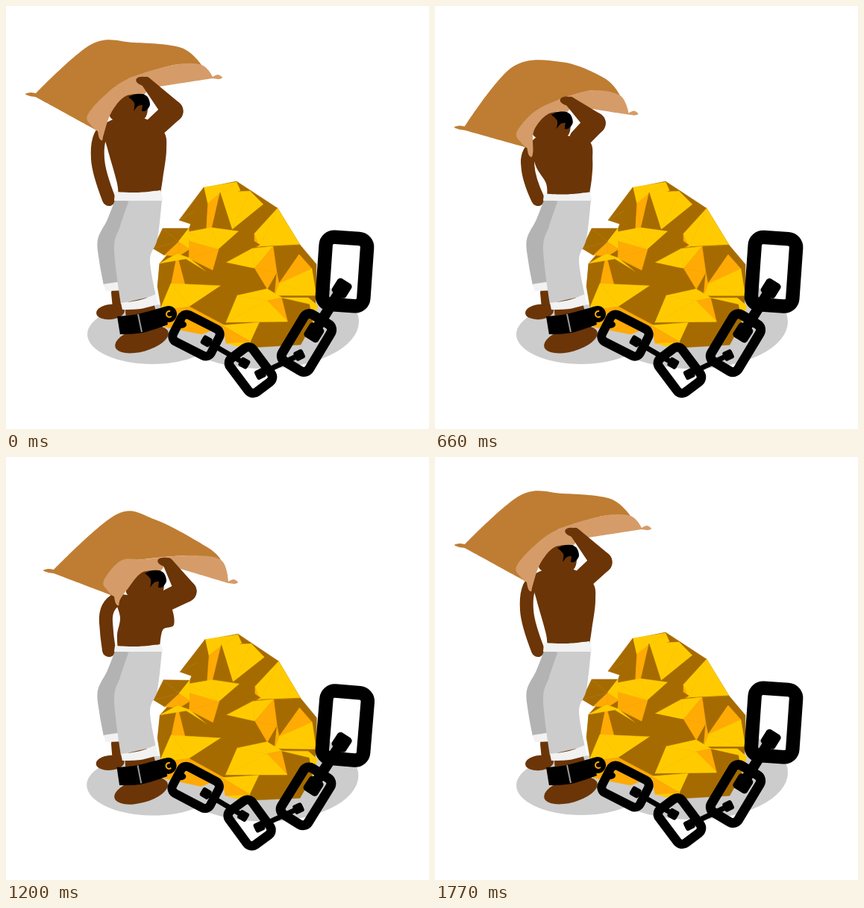
An HTML page with a canvas that plays this animation: 567x567 px, repeating every 1800 ms.

```html
<!DOCTYPE html>
<html>
<head>
<meta charset="utf-8">
<style>
html, body { margin: 0; width: 100%; height: 100%; overflow: hidden; background: #fff; }
canvas { display: block; width: 567px; height: 567px; }
</style>
</head>
<body>
<canvas id="stage" width="567" height="567"></canvas>
<script>
const ctx = document.getElementById('stage').getContext('2d');
const LOOP = 1800, STEP = 30;
const SKIN = '#6b3507', GREY = '#cccccc', CUFF = '#f2f2f2', BLACK = '#000';
const SHADES = { y: '#ffcb00', o: '#ffaa05', d: '#a66b00' };

// Each joint passes through four poses: rise, stoop, lift, lean
const joints = {
  tipL: [[40, 117], [32, 161], [46, 162], [64, 151]],
  crestL: [[115, 51], [86, 99], [118, 68], [148, 77]],
  crestM: [[172, 49], [147, 87], [190, 66], [200, 84]],
  crestR: [[235, 56], [207, 96], [244, 98], [270, 121]],
  hem: [[262, 79], [237, 119], [257, 121], [288, 138]],
  tipR: [[277, 95], [244, 138], [272, 148], [298, 167]],
  brow: [[225, 79], [205, 116], [215, 111], [245, 132]],
  fold: [[165, 97], [155, 136], [175, 117], [185, 137]],
  low: [[124, 168], [110, 207], [136, 177], [146, 187]],
  head: [[0, 0], [-26, 32], [6, 17], [22, 34]],
  shoulder: [[130, 163], [117, 200], [139, 176], [147, 187]],
  elbowL: [[123, 205], [116, 219], [131, 210], [134, 222]],
  side: [[211, 168], [195, 182], [217, 182], [221, 200]],
  elbowR: [[223, 141], [197, 161], [228, 154], [241, 180]],
  hand: [[188, 102], [162, 137], [197, 122], [217, 142]],
  ground: [[0, 0], [-.0066, 3], [.0066, 2], [.0133, 4]]   // tilt, belt drop
};

const times = [0, 510, 930, 1260, 1770, 1800];
const mix = (a, b, k) => a.map((v, i) => v + (b[i] - v) * k);
const tracks = {};
for (const name in joints) {
  const [rise, stoop, lift, lean] = joints[name];
  // The turning points lie a little past lift and lean
  const peak = mix(stoop, lift, 420 / 270);
  tracks[name] = [rise, stoop, peak, mix(peak, lean, 330 / 270), rise, rise];
}

function poseAt(t) {
  let i = 0;
  while (t >= times[i + 1]) i++;
  const k = (t - times[i]) / (times[i + 1] - times[i]), pose = {};
  for (const name in tracks) pose[name] = mix(tracks[name][i], tracks[name][i + 1], k);
  return pose;
}

// Points from x,y pairs, shifted by an anchor
function from([ox, oy], ...xy) {
  const out = [];
  for (let i = 0; i < xy.length; i += 2) out.push([ox + xy[i], oy + xy[i + 1]]);
  return out;
}
const pts = (...xy) => from([0, 0], ...xy);

function poly(color, p) {
  ctx.fillStyle = ctx.strokeStyle = color;
  ctx.lineWidth = .5;
  ctx.beginPath();
  p.forEach(q => ctx.lineTo(...q));
  ctx.closePath();
  ctx.fill();
  ctx.stroke();
}

// Closed smooth outline; the listed points stay sharp
function blob(color, p, sharp = []) {
  const n = p.length, at = i => p[(i + n) % n];
  ctx.fillStyle = color;
  ctx.beginPath();
  ctx.moveTo(...p[0]);
  for (let i = 0; i < n; i++) {
    const a = at(i - 1), b = at(i), c = at(i + 1), d = at(i + 2);
    const s = sharp.includes(i) ? 0 : 1 / 6, e = sharp.includes((i + 1) % n) ? 0 : 1 / 6;
    ctx.bezierCurveTo(b[0] + (c[0] - a[0]) * s, b[1] + (c[1] - a[1]) * s,
      c[0] - (d[0] - b[0]) * e, c[1] - (d[1] - b[1]) * e, ...c);
  }
  ctx.fill();
}

function oval(color, x, y, rx, ry, turn = 0) {
  ctx.fillStyle = color;
  ctx.beginPath();
  ctx.ellipse(x, y, rx, ry, turn, 0, Math.PI * 2);
  ctx.fill();
}

// Tapered limb with round ends
function limb([x1, y1], r1, [x2, y2], r2) {
  const a = Math.atan2(y2 - y1, x2 - x1), b = Math.acos((r1 - r2) / Math.hypot(x2 - x1, y2 - y1));
  ctx.fillStyle = SKIN;
  ctx.beginPath();
  ctx.arc(x1, y1, r1, a + b, a - b);
  ctx.arc(x2, y2, r2, a - b, a + b);
  ctx.fill();
}

function line(color, width, x1, y1, x2, y2) {
  ctx.strokeStyle = color;
  ctx.lineWidth = width;
  ctx.beginPath();
  ctx.moveTo(x1, y1);
  ctx.lineTo(x2, y2);
  ctx.stroke();
}

function link(x, y, w, h, deg, thick) {
  ctx.save();
  ctx.translate(x, y);
  ctx.rotate(deg * Math.PI / 180);
  ctx.strokeStyle = BLACK;
  ctx.lineWidth = thick;
  ctx.beginPath();
  ctx.roundRect((thick - w) / 2, (thick - h) / 2, w - thick, h - thick, thick / 2 + 2);
  ctx.stroke();
  ctx.restore();
}

// A link seen edge-on: thin rod with a rounded block at each end
function bar(x1, y1, x2, y2, thin, thick) {
  const len = Math.hypot(x2 - x1, y2 - y1);
  ctx.save();
  ctx.translate(x1, y1);
  ctx.rotate(Math.atan2(y2 - y1, x2 - x1));
  ctx.fillStyle = BLACK;
  ctx.fillRect(0, -thin / 2, len, thin);
  for (const x of [0, len - thick]) {
    ctx.beginPath();
    ctx.roundRect(x, -thick / 2, thick, thick, thick / 5);
    ctx.fill();
  }
  ctx.restore();
}

// A rock is a fan of facets around its ridge, one shade letter per edge
function rock(ridge, shades, ...xy) {
  const rim = pts(...xy);
  rim.forEach((p, i) => poly(SHADES[shades[i]], [p, rim[(i + 1) % rim.length], ridge]));
}

function gold() {
  poly(SHADES.d, pts(265, 244, 309, 235, 364, 271, 394, 320, 416, 346, 416, 388, 411, 425, 395, 454,
    326, 458, 290, 430, 212, 428, 203, 376, 206, 345, 244, 302));
  rock([270, 265], 'yyyoodd', 265, 243, 309, 236, 314, 247, 287, 251, 276, 298, 268, 299, 232, 287);
  rock([303, 300], 'yydddd', 287, 250, 327, 248, 345, 266, 364, 271, 334, 306, 276, 298);
  rock([340, 323], 'ydoy', 364, 271, 394, 320, 333, 323, 333, 305);
  rock([231, 316], 'dyoodd', 210, 298, 245, 298, 246, 326, 232, 335, 212, 334, 197, 325);
  rock([285, 326], 'yydddooy', 243, 303, 275, 297, 312, 302, 340, 320, 296, 345, 277, 354, 245, 338, 246, 315);
  rock([229, 332], 'ydoddy', 246, 338, 268, 356, 240, 374, 221, 372, 204, 374, 206, 345);
  rock([333, 352], 'yyooddd', 295, 344, 330, 325, 358, 322, 363, 357, 350, 380, 310, 390, 280, 352);
  rock([366, 372], 'dooyyo', 363, 357, 386, 344, 393, 333, 410, 352, 416, 388, 360, 388);
  rock([246, 403], 'yydooo', 206, 408, 221, 372, 288, 375, 293, 428, 262, 440, 212, 430);
  rock([350, 395], 'yyoyy', 310, 388, 350, 379, 370, 391, 378, 423, 295, 424);
  rock([405, 391], 'yddy', 418, 402, 411, 425, 378, 423, 370, 391);
  rock([328, 450], 'ydyo', 290, 428, 340, 424, 326, 460, 295, 452);
}

function feet() {
  limb([148, 384], 7, [151, 405], 8);
  oval(SKIN, 140, 410, 19, 10, -.1);
  limb([180, 408], 20, [185, 436], 22);
  oval(SKIN, 182, 447, 37, 16, -.28);
}

function shackle() {
  blob(BLACK, pts(149, 416, 176, 413, 213, 403, 217, 427, 183, 438, 153, 440), [0, 2, 3, 5]);
  line('#999', 2, 177, 413, 182, 437);
  oval(BLACK, 218, 413, 11, 11);
  ctx.strokeStyle = SHADES.o;
  ctx.lineWidth = 2;
  ctx.beginPath();
  ctx.arc(219, 413, 4, .8, 5);
  ctx.stroke();
}

function chain() {
  link(255, 441.5, 69, 52, 27, 12);
  link(328, 488, 69, 51, 53, 12.5);
  link(403, 451.5, 86, 55, 121, 13);
  link(454, 356, 74, 109, 4, 18.5);
  bar(263, 446, 325, 482, 7, 13);
  bar(335, 496, 399, 465, 7, 13);
  bar(407, 447, 456, 369, 14, 22);
  oval(BLACK, 235, 427, 7, 5);
}

function trousers(drop) {
  blob('#b3b3b3', pts(146, 260, 175, 262, 170, 330, 151, 372, 131, 374, 125, 342, 123, 313, 136, 286), [0, 1, 3, 4]);
  poly(CUFF, pts(131, 373, 151, 370, 154, 381, 134, 382));
  blob(GREY, pts(165, 260, 209, 260, 203, 312, 193, 340, 201, 388, 154, 399, 145, 326, 153, 295), [0, 1, 4, 5]);
  blob(CUFF, pts(154, 398, 180, 394, 201, 386, 204, 400, 180, 406, 156, 407), [0, 2, 3, 5]);
  blob(CUFF, pts(146, 249 + drop, 176, 250 + drop, 207, 247 + drop, 211, 261, 177, 261, 145, 261), [0, 2, 3, 5]);
}

function body({ shoulder, elbowL, side, head }) {
  const [sx, sy] = shoulder, [ex, ey] = elbowL;
  ctx.strokeStyle = SKIN;
  ctx.lineWidth = 18;
  ctx.lineCap = ctx.lineJoin = 'round';
  ctx.beginPath();
  ctx.moveTo(sx + 3, sy + 3);
  ctx.quadraticCurveTo(ex - 2, sy + 12, ex, ey);
  ctx.quadraticCurveTo(ex + 1, ey + 18, 138, 259);
  ctx.stroke();
  ctx.lineCap = 'butt';
  blob(SKIN, [
    ...from(head, 148, 151, 183, 150), side, ...from(side, 4, 25),
    ...pts(210, 232, 206, 258, 150, 258, 149, 238), ...from(shoulder, 6, 28), shoulder
  ], [5, 6]);
}

function face(head) {
  blob(SKIN, from(head, 139, 145, 150, 125, 170, 118, 187, 124, 190, 138, 184, 152, 160, 157, 146, 154));
  blob(BLACK, from(head, 164, 122, 178, 117, 189, 121, 193, 132, 188, 140, 182, 141, 183, 133, 177, 134, 171, 141, 172, 130), [0, 5, 6, 8]);
}

function sack({ tipL, crestL, crestM, crestR, hem, tipR, brow, fold, low, head }) {
  blob('#bf7d33', [
    ...from(tipL, -7, 4, -14, 1, -7, -1), tipL, crestL, crestM, crestR, hem, brow, fold,
    ...from(low, 15, -45, -4, -23, 0, 0), ...from(tipL, 0, 5)
  ], [3, 7, 9, 12, 13]);
  blob('#d59c69', [
    hem, brow, fold, ...from(low, 8, -48, -15, -21, -9, -7, -1, 0, 1, 9, 5, 12, 7, 4),
    ...from(head, 141, 143, 160, 121, 186, 118, 192, 110),
    ...from(tipR, 0, 2, 8, 3, 13, 1, 7, -3), tipR
  ], [6, 12, 13, 14, 18]);
}

function raisedArm({ side, elbowR, hand }) {
  limb([side[0] - 13, side[1] - 4], 14, elbowR, 14.5);
  limb(elbowR, 14.5, hand, 7);
  oval(SKIN, hand[0] - 3, hand[1] - 1, 11, 6, .2);
}

function tilted(angle, paint) {
  ctx.save();
  ctx.translate(150, 380);
  ctx.rotate(angle);
  ctx.translate(-150, -380);
  paint();
  ctx.restore();
}

function draw(t) {
  const pose = poseAt(t), [tilt, drop] = pose.ground;
  ctx.fillStyle = '#fff';
  ctx.fillRect(0, 0, 567, 567);
  tilted(tilt, () => {
    oval(GREY, 196, 440, 87, 40);
    oval(GREY, 345, 423, 128, 63);
    gold();
    feet();
  });
  body(pose);
  trousers(drop);
  face(pose.head);
  sack(pose);
  raisedArm(pose);
  tilted(tilt, () => {
    shackle();
    chain();
  });
}

const start = performance.now();
function tick() {
  const t = (performance.now() - start) % LOOP;
  draw(Math.floor(t / STEP) * STEP);
  requestAnimationFrame(tick);
}
tick();
</script>
</body>
</html>
```
